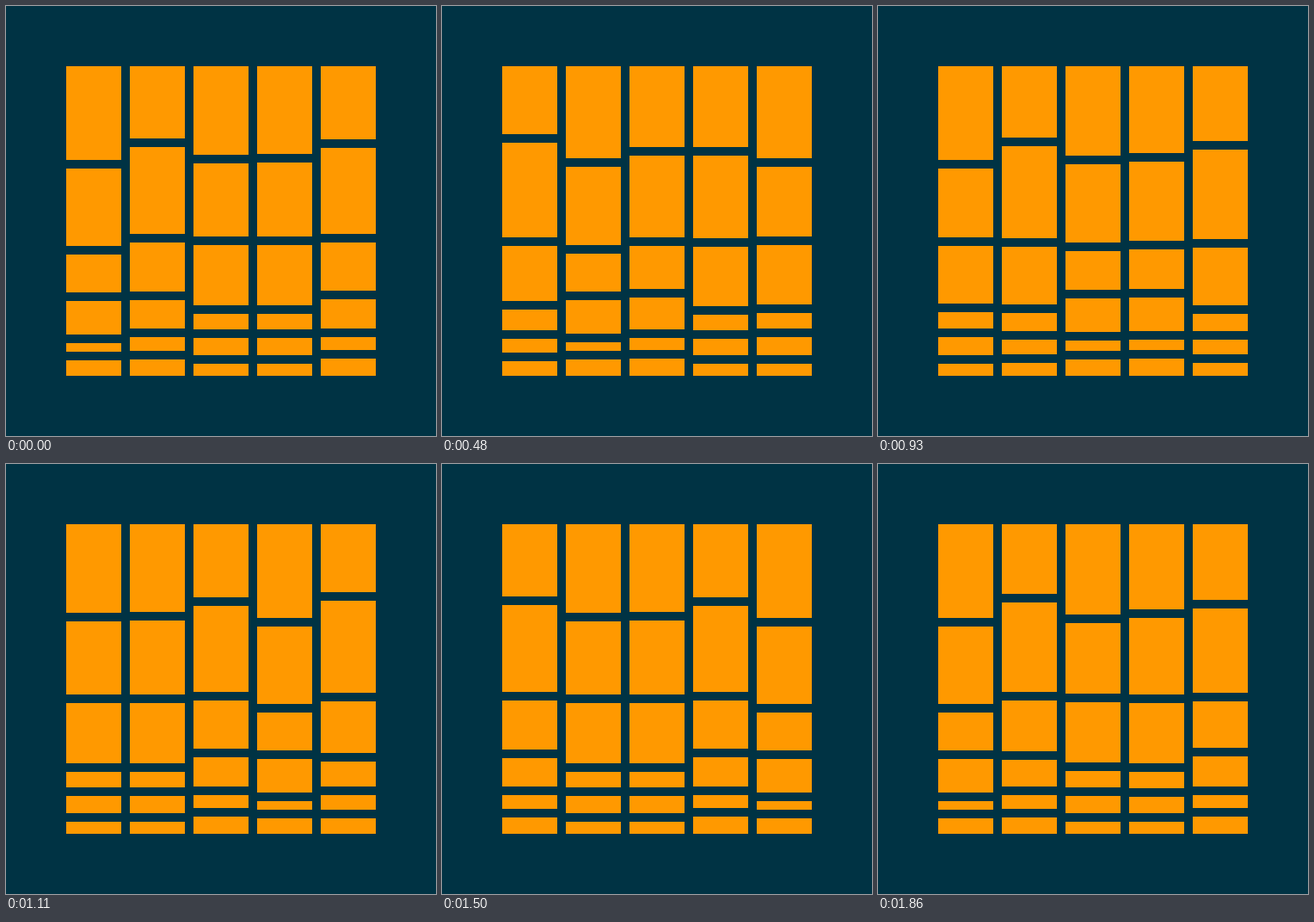
These frames come from a looping animation (500 by 500 pixels, 1890 ms). An HTML page:

```html
<!DOCTYPE html>
<html lang="en">
<head>
<meta charset="utf-8">
<title>Shifting bars</title>
<style>
  html, body { margin: 0; width: 100%; height: 100%; overflow: hidden; background: #034; }
  svg { display: block; width: 100%; height: 100%; }
</style>
</head>
<body>
<svg viewBox="0 0 500 500" fill="#f90" shape-rendering="crispEdges"></svg>
<script>
const COLUMNS = 5, WIDTH = 64, GAP = 10, START = 70, END = 430;
const STEP = 30, PERIOD = 63, DELAY = 13, LEAD = .85;

// Lower edge of each bar as a cosine series: mean, then the swing of each harmonic.
const edges = [
  [166, 0, 15.5, 0, -2.5],
  [270.3, 3.7, 3.2, 3, .4, -1.4],
  [339.3, -10.2, -.3, 4.2, .6, -.5],
  [377.2, 1.9, 1.4, 2, .3, -.4],
  [403.2, -3, .7, 1.2],
  [END]
];

const svg = document.querySelector('svg');

const columns = Array.from({ length: COLUMNS }, (_, c) =>
  edges.map(() => {
    const bar = document.createElementNS('http://www.w3.org/2000/svg', 'rect');
    bar.setAttribute('x', START + c * (WIDTH + GAP));
    bar.setAttribute('width', WIDTH);
    return svg.appendChild(bar);
  }));

const cosineSeries = (swings, angle) =>
  swings.reduce((sum, swing, k) => sum + swing * Math.cos(k * angle), 0);

// Every column repeats the same motion, a fixed delay after its left neighbour.
function draw(ms) {
  const step = Math.floor(ms / STEP) % PERIOD;
  columns.forEach((bars, c) => {
    const angle = 2 * Math.PI * (step - c * DELAY + LEAD) / PERIOD;
    let y = START;
    bars.forEach((bar, r) => {
      const end = Math.round(cosineSeries(edges[r], angle));
      bar.setAttribute('y', y);
      bar.setAttribute('height', end - y);
      y = end + GAP;
    });
  });
}

function tick() {
  draw(performance.now());
  requestAnimationFrame(tick);
}
tick();
</script>
</body>
</html>
```
